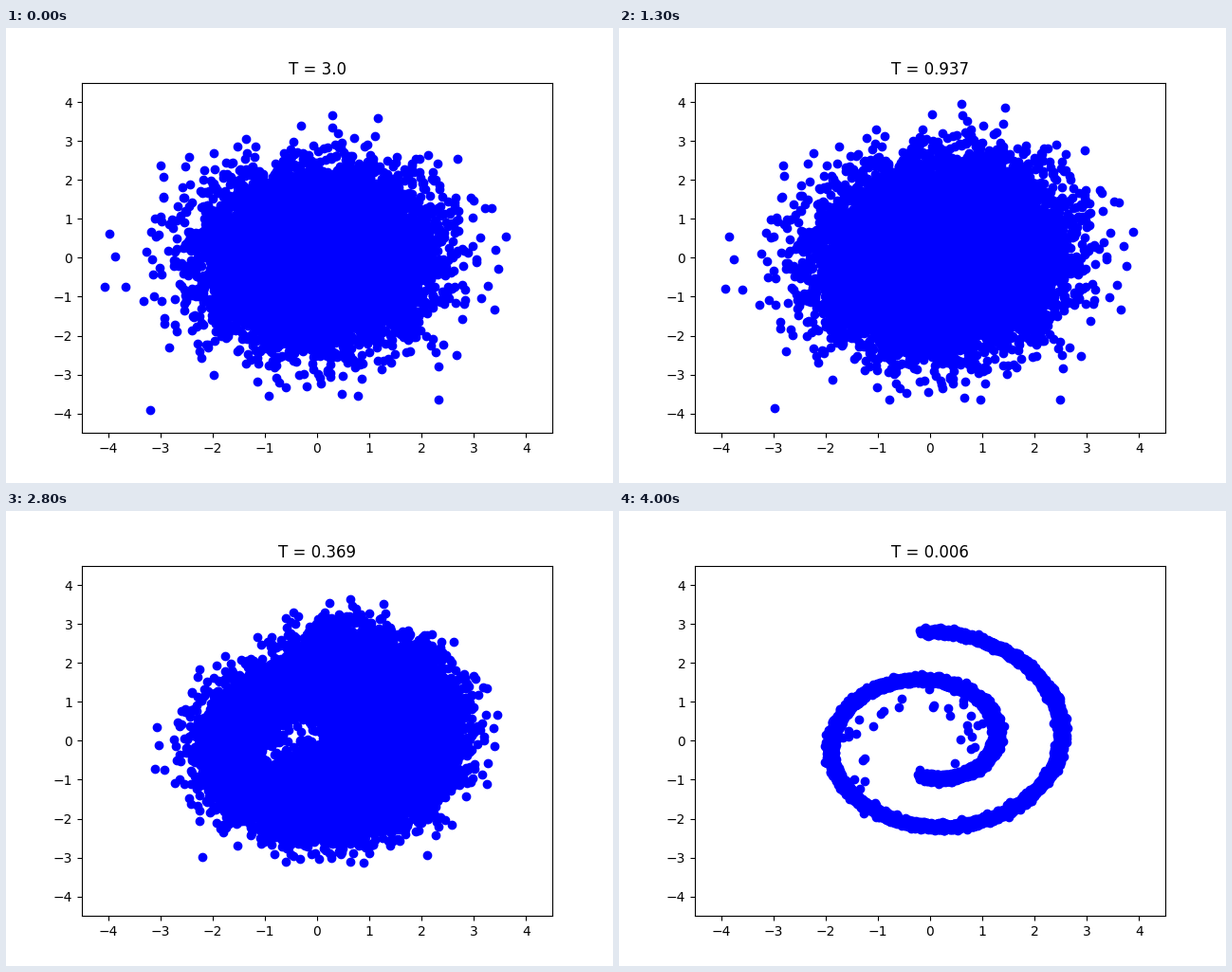
These frames come from a looping animation (640x480 px, 4100 ms). A matplotlib script:

```python
import math

import matplotlib.pyplot as plt
import numpy as np
from matplotlib.animation import FuncAnimation

FRAMES, INTERVAL = 41, 100
COUNT, ANCHORS, SUBSTEPS = 10000, 300, 2
ROLL_NOISE = 0.035
BETA_MIN = 0.12
SETTLE, STRAYS = 31, 34  # frame where stragglers fall behind, and how many

rng = np.random.default_rng(4)


def schedule(steps):
    """Noise time at each step, nearly even on an error-function scale."""
    def warp(t):
        return np.array([math.erf(0.755 * v) for v in t])

    grid = np.linspace(0, 3.2, 3201)
    key_steps = [0, 5, 13, 20, 24, 31, 40]
    key_times = [3.0, 1.464, 0.937, 0.642, 0.5, 0.275, 0.006]
    level = np.interp(steps, key_steps, warp(key_times))
    return np.interp(level, warp(grid), grid)


def spiral():
    u = (np.arange(ANCHORS) + 0.5) / ANCHORS
    t = 1.5 * np.pi - 0.15 + u * (3 * np.pi + 0.2)
    return (np.column_stack([t * np.cos(t), t * np.sin(t)]) / 5).astype(np.float32)


def scales(t):
    """Signal and noise amplitude at noise time t."""
    a = math.exp(-(BETA_MIN * t + t * t) / 2)
    return a, math.sqrt(1 - a * a)


def denoise(x, anchors, a, s):
    """Posterior mean of the clean point for a spiral of small Gaussians."""
    var = (a * ROLL_NOISE) ** 2 + s * s
    bias = (a * a / (2 * var)) * (anchors ** 2).sum(axis=1)
    w = x @ (anchors.T * np.float32(a / var))
    w -= bias.astype(np.float32)
    w -= w.max(axis=1, keepdims=True)
    np.exp(w, out=w)
    mean = (w @ anchors) / w.sum(axis=1, keepdims=True)
    return mean + (a * ROLL_NOISE ** 2 / var) * (x - a * mean)


def flow(times):
    """Carry a normal cloud onto the spiral, one position array per frame."""
    anchors = spiral()
    x = rng.standard_normal((COUNT, 2)).astype(np.float32)
    path = [x]
    for k in range(len(times) - 1):
        a, s = scales(times[k])
        clean = denoise(x, anchors, a, s)
        noise = (x - a * clean) / s
        a, s = scales(times[k + 1])
        x = (a * clean + s * noise).astype(np.float32)
        if (k + 1) % SUBSTEPS == 0:
            path.append(x)
    return path


def hold_back(path):
    """Inner points with the longest way left cover only part of it."""
    base = path[SETTLE]
    leg = np.hypot(*(path[-1] - base).T)
    leg[np.hypot(*base.T) > 2.3] = 0
    slow = np.argsort(leg)[-STRAYS:]
    share = rng.uniform(0.3, 0.95, (STRAYS, 1))
    for pos in path[SETTLE + 1:]:
        pos[slow] = base[slow] + share * (pos[slow] - base[slow])


times = schedule(np.arange((FRAMES - 1) * SUBSTEPS + 1) / SUBSTEPS)
path = flow(times)
hold_back(path)

fig, ax = plt.subplots(figsize=(6.4, 4.8), dpi=100)
ax.set_xlim(-4.5, 4.5)
ax.set_ylim(-4.5, 4.5)
dots, = ax.plot([], [], "bo")
title = ax.set_title("")


def draw(k):
    dots.set_data(path[k][:, 0], path[k][:, 1])
    title.set_text(f"T = {round(float(times[k * SUBSTEPS]), 3)}")
    return dots, title


anim = FuncAnimation(fig, draw, frames=FRAMES, interval=INTERVAL,
                     repeat=True, repeat_delay=0, blit=False)
plt.show()
```
